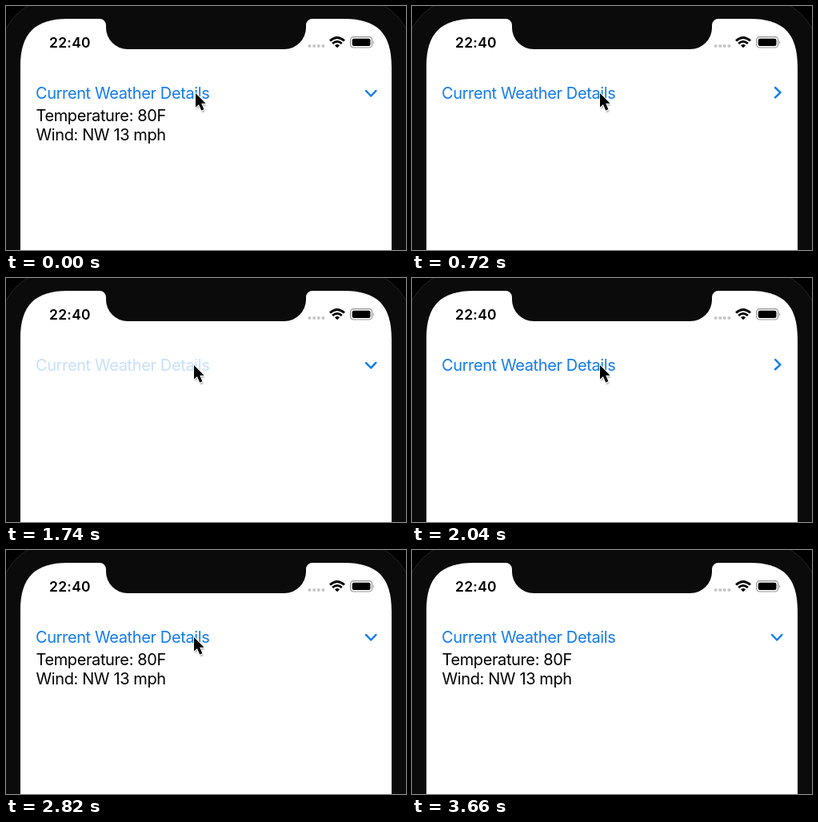
Recreate the animation shown at these times as an HTML page. Size 500x305 px, loop 4.2 s.

```html
<!DOCTYPE html>
<html lang="en">
<head>
<meta charset="utf-8">
<title>Weather disclosure</title>
<style>
  html, body { margin: 0; width: 100%; height: 100%; overflow: hidden; background: #000; }
  svg { display: block; width: 500px; height: 305px; }
  text { font: 20px Inter, sans-serif; letter-spacing: -.39px; white-space: pre; }
  .clock { font-size: 17.5px; font-weight: 600; letter-spacing: .25px; }
</style>
</head>
<body>
<svg viewBox="0 0 500 305">
  <defs>
    <clipPath id="reveal"><rect id="revealBox" x="30" y="121" width="300" height="54"/></clipPath>
    <filter id="soft" x="-50%" y="-50%" width="200%" height="200%"><feGaussianBlur stdDeviation="1.3"/></filter>
    <path id="arrow" d="M0 0V17.6L4 13.9 7.2 21.5 10.4 20.2 7.2 12.8H12.6Z"/>
  </defs>

  <rect x="-9" y="-11" width="518" height="400" rx="75" fill="#0b0b0b" stroke="#262626"/>
  <path d="M18 310V76C18 34 36 16 78 16H117A8 8 0 0 1 125 24V27A27 27 0 0 0 152 54H348A27 27 0 0 0 375 27V24A8 8 0 0 1 383 16H422C464 16 482 34 482 76V310Z" fill="#fff"/>

  <text class="clock" x="54" y="52">22:40</text>
  <path d="M379.5 50h.1m5.5 0h.1m5.5 0h.1m5.5 0h.1" stroke="#c6c6c6" stroke-width="4" stroke-linecap="round"/>
  <g fill="none" stroke="#000" stroke-width="2.7">
    <path d="M405 43.6Q414 35.4 423 43.6M408.2 47Q414 41.6 419.8 47"/>
    <path d="M411 49.2Q414 46.6 417 49.2L414 52.2Z" fill="#000" stroke="none"/>
  </g>
  <rect x="430.6" y="38.6" width="27" height="13.4" rx="4" fill="none" stroke="#929292" stroke-width="1.2"/>
  <rect x="432.7" y="40.7" width="22.8" height="9.2" rx="2.2"/>
  <path d="M459 43.2Q461 45.3 459 47.4Z" fill="#929292"/>

  <text id="title" x="37" y="115.6" fill="#127ced">Current Weather Details</text>
  <path id="chevron" d="M-2.2 -6.2L4.3 0L-2.2 6.2" fill="none" stroke="#127ced" stroke-width="2.5" stroke-linecap="round" stroke-linejoin="round"/>
  <g id="details" clip-path="url(#reveal)">
    <text x="37.5" y="144.3">Temperature: 80F</text>
    <text x="37.5" y="168.4">Wind: NW 13 mph</text>
  </g>

  <g id="cursor">
    <use href="#arrow" x="1" y="2.5" opacity=".4" filter="url(#soft)"/>
    <use href="#arrow" stroke="#fff" stroke-width="2" stroke-linejoin="round"/>
    <use href="#arrow"/>
  </g>
</svg>
<script>
const LOOP = 4200, TOGGLE = 350, FADE = 320, DIM = 0.22;
// Each tap dims the title; the release starts the toggle.
const taps = [
  { press: 60, release: 220, open: false },
  { press: 900, release: 980, open: true },
  { press: 1560, release: 1720, open: false },
  { press: 2400, release: 2480, open: true },
];

const $ = id => document.getElementById(id);
const title = $('title'), chevron = $('chevron'), details = $('details');
const revealBox = $('revealBox'), cursor = $('cursor');

const ramp = (t, from, to) => {
  const x = Math.min(1, Math.max(0, (t - from) / (to - from)));
  return x * x * (3 - 2 * x);
};

function draw(t) {
  let turn = 1, height = 1, opacity = 1;
  for (const { press, release, open } of taps) {
    if (t < press) break;
    opacity = DIM + (1 - DIM) * ramp(t, release, release + FADE);
    if (t < release) continue;
    const p = ramp(t, release, release + TOGGLE);
    turn = open ? p : 1 - p;
    height = open ? p : 0; // content disappears at once on closing
  }
  title.setAttribute('opacity', opacity);
  // The matrix itself is blended, so the chevron shrinks a little mid-turn.
  chevron.setAttribute('transform', `matrix(${1 - turn} ${turn} ${-turn} ${1 - turn} 456.2 108.2)`);
  revealBox.setAttribute('height', 54 * height);
  details.style.display = height > 0 ? '' : 'none';

  const leave = ramp(t, 2955, 3415);
  const x = 237 - 2 * ramp(t, 0, 300) - 253 * leave;
  const y = 109 - 5 * Math.sin(Math.PI * leave);
  cursor.setAttribute('transform', `translate(${x} ${y})`);
  cursor.style.display = leave < 1 ? '' : 'none';
}

const start = performance.now();
function tick() {
  draw((performance.now() - start) % LOOP);
  requestAnimationFrame(tick);
}
tick();
</script>
</body>
</html>
```
